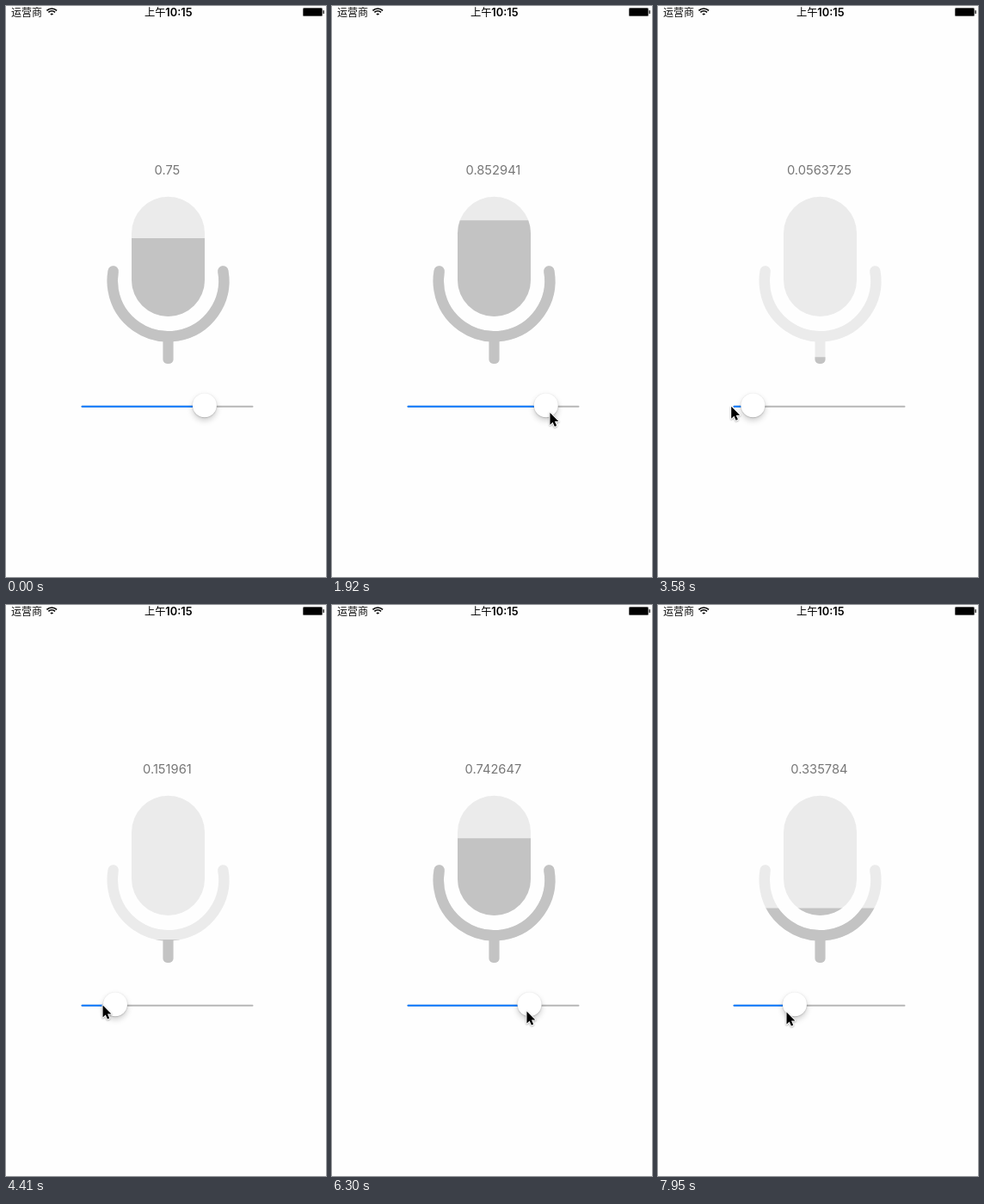
Animation, 372 px wide and 664 px high, one loop 8000 ms. Source, as an HTML page with a canvas:

```html
<!DOCTYPE html>
<html lang="zh">
<head>
<meta charset="utf-8">
<title>Microphone level</title>
<style>
  html, body { margin: 0; width: 100%; height: 100%; overflow: hidden; background: #fefefe; }
  canvas { display: block; }
</style>
</head>
<body>
<canvas id="stage" width="372" height="664"></canvas>
<script>
const ctx = document.getElementById('stage').getContext('2d');
const LOOP = 8000;
const START = 500;    // the pointer shows up
const TICK = 118.25;  // time between screen updates
const CX = 188.5;
const FONT = 'Inter, "Noto Sans CJK SC", "Noto Sans CJK", sans-serif';

// Drag path: time, rest there, pointer x, pointer y, slider value before clamping
const path = [
  [500, 0, 287, 549, .75], [960, 0, 197, 467, .75], [1210, 230, 231, 472, .75],
  [1920, 0, 253.5, 473, .852941], [2390, 250, 293, 476.5, 1],
  [2983, 0, 179.5, 465, .563725], [3820, 230, 72.5, 466, -.02],
  [4402, 0, 112.5, 465.5, .151961], [5230, 0, 261.5, 474.5, .894608],
  [5700, 130, 291, 476, 1.03], [6294, 0, 226.5, 472.5, .742647],
  [7360, 110, 36.5, 468, -.25], [7950, 0, 149.5, 473.5, .335784]
];
const keys = path.flatMap(([t, rest, ...p]) =>
  rest ? [[t, ...p], [t + rest, ...p]] : [[t, ...p]]);

// Tangent at key i: flat at turning points, stops and both ends
function slope(i, j) {
  const a = keys[i - 1], b = keys[i], c = keys[i + 1];
  if (!a || !c || (b[j] - a[j]) * (c[j] - b[j]) <= 0) return 0;
  return (c[j] - a[j]) / (c[0] - a[0]);
}

function glide(t, j) {
  const i = keys.findIndex(k => k[0] >= t);
  if (i < 1) return keys[i < 0 ? keys.length - 1 : 0][j];
  const a = keys[i - 1], b = keys[i], h = b[0] - a[0];
  const p = (t - a[0]) / h, q = 1 - p;
  return q * q * (1 + 2 * p) * a[j] + p * p * (1 + 2 * q) * b[j]
    + h * p * q * (q * slope(i - 1, j) - p * slope(i, j));
}

function poseAt(time) {
  const t = START + Math.floor((time - START) / TICK) * TICK;
  const v = Math.min(1, Math.max(0, glide(t, 3)));
  return { x: glide(t, 1), y: glide(t, 2), value: Math.round(v * 408) / 408, pointer: t >= START };
}

function text(str, x, y, font, color, align) {
  ctx.font = font + ' ' + FONT;
  ctx.fillStyle = color;
  ctx.textAlign = align;
  ctx.fillText(str, x, y);
}

function bar(x, y, w, h, r, color) {
  ctx.fillStyle = color;
  ctx.beginPath();
  ctx.roundRect(x, y, w, h, r);
  ctx.fill();
}

function statusBar() {
  text('运营商', 6, 11.5, '400 12px', '#111', 'left');
  text('上午', 161, 11.5, '500 12.3px', '#000', 'left');
  text('10:15', 216.5, 11.5, '600 12.8px', '#000', 'right');

  // Wi-Fi
  ctx.strokeStyle = ctx.fillStyle = '#000';
  ctx.lineCap = 'butt';
  ctx.lineWidth = 1.6;
  for (const r of [8.2, 5.4, 1.8]) {
    ctx.beginPath();
    ctx.arc(53.2, 11.2, r, -Math.PI * .75, -Math.PI * .25);
    ctx.stroke();
  }

  // Battery
  bar(345, 2, 23, 10, 1.6, '#555');
  bar(346, 3, 21, 8, .6, '#000');
  bar(368.5, 5, 1.4, 4, .6, '#222');
}

function micShape(color) {
  bar(146, 221.7, 85, 139.3, 42.5, color);
  const tilt = Math.asin(11 / 65);
  ctx.strokeStyle = color;
  ctx.lineWidth = 12.4;
  ctx.lineCap = 'round';
  ctx.beginPath();
  ctx.arc(CX, 319.4, 64.8, -tilt, Math.PI + tilt);
  ctx.stroke();
  bar(CX - 6, 386, 12, 30, [0, 0, 5, 5], color);
}

function mic(value) {
  const level = 419.5 - 199.5 * value;
  micShape('#ebebeb');
  ctx.save();
  ctx.beginPath();
  ctx.rect(100, level, 180, 440 - level);
  ctx.clip();
  micShape('#c3c3c3');
  ctx.restore();
}

function disc(x, y, r, alpha, blur, dy) {
  ctx.save();
  ctx.shadowColor = `rgba(0,0,0,${alpha})`;
  ctx.shadowBlur = blur;
  ctx.shadowOffsetY = dy;
  ctx.fillStyle = '#fff';
  ctx.beginPath();
  ctx.arc(x, y, r, 0, Math.PI * 2);
  ctx.fill();
  ctx.restore();
}

function slider(value) {
  const x = 100.6 + 173.7 * value;
  bar(87.5, 464.8, 200, 2, 1, '#b6b6b6');
  bar(87.5, 464.8, x - 87.5, 2, 1, '#0a7aff');
  disc(x, 464.4, 13.9, .2, 7, 3.6);
  disc(x, 464.4, 13.9, .25, 1.5, .6);
}

function pointer(x, y) {
  const outline = [[0, 0], [0, 14], [3.2, 11], [5.4, 16], [7.7, 15], [5.5, 10.1], [9.9, 10]];
  ctx.save();
  ctx.translate(x, y);
  ctx.beginPath();
  for (const [px, py] of outline) ctx.lineTo(px, py);
  ctx.closePath();
  ctx.lineJoin = 'round';
  ctx.lineWidth = 2;
  ctx.strokeStyle = '#fff';
  ctx.shadowColor = 'rgba(0,0,0,.35)';
  ctx.shadowBlur = 2;
  ctx.shadowOffsetY = .8;
  ctx.stroke();
  ctx.shadowColor = 'transparent';
  ctx.fillStyle = '#000';
  ctx.fill();
  ctx.restore();
}

function label(value) {
  return Number.isInteger(value) ? value.toFixed(1) : String(+value.toPrecision(6));
}

function draw() {
  const pose = poseAt(performance.now() % LOOP);
  ctx.fillStyle = '#fefefe';
  ctx.fillRect(0, 0, 372, 664);
  statusBar();
  text(label(pose.value), 187.4, 196, '400 14.7px', '#777', 'center');
  mic(pose.value);
  slider(pose.value);
  if (pose.pointer) pointer(pose.x, pose.y);
  requestAnimationFrame(draw);
}
draw();
</script>
</body>
</html>
```
